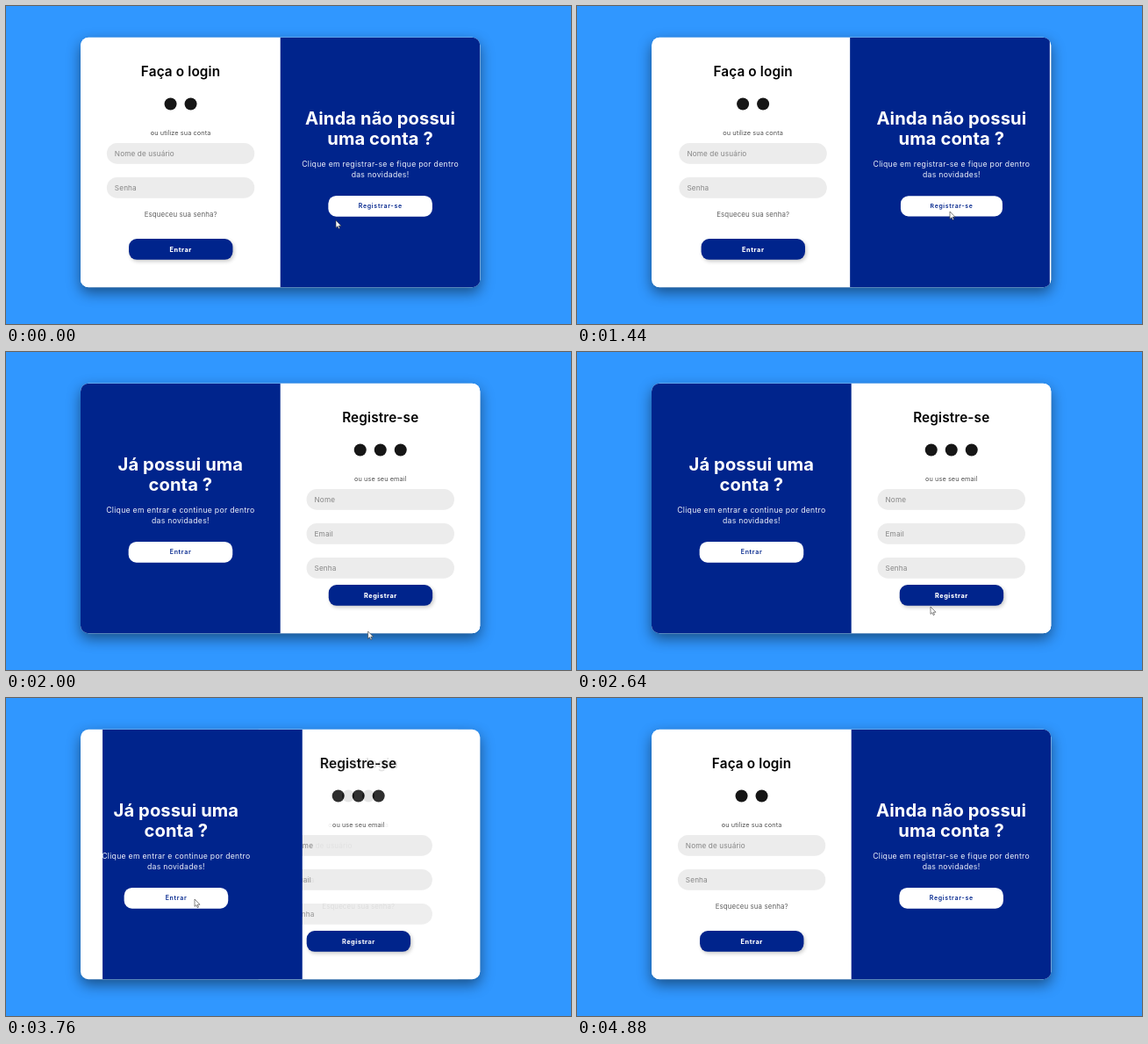
An HTML page with a canvas for the animation above (4.96 s loop, 644 by 362 pixels).

```html
<!DOCTYPE html>
<html lang="pt-BR">
<head>
<meta charset="utf-8">
<title>Login</title>
<style>
  html, body { margin: 0; width: 100%; height: 100%; overflow: hidden; background: #3097ff; }
  canvas { display: block; }
</style>
</head>
<body>
<canvas id="stage" width="644" height="362"></canvas>
<script>
const stage = document.getElementById('stage').getContext('2d');
const layer = new OffscreenCanvas(644, 362).getContext('2d');
let ctx = stage;
const LOOP = 4960, STEP = 80;
const SKY = '#3097ff', NAVY = '#00248c', FIELD = '#ececec', INK = '#161616';
const CARD = { x: 85, y: 35.8, w: 455.4, h: 284.4 };
const HALF = CARD.w / 2, LEFT = CARD.x + HALF / 2, RIGHT = LEFT + HALF;
const OPEN = { at: 1406, length: 576 }, CLOSE = { at: 3612, length: 640 };

// Pointer stops: time, x, y
const POINTER = [
  [0, 376, 244], [400, 452, 284], [700, 462, 270], [1050, 428, 235], [1440, 425, 234],
  [1760, 415, 314], [2100, 412, 319], [2640, 403, 290], [3400, 217, 230], [3760, 215, 229],
  [4080, 247, 274], [4400, 262, 282]
];

const clamp = v => Math.min(1, Math.max(0, v));
const smooth = v => v * v * (3 - 2 * v);

// cubic-bezier(.42, 0, .58, 1)
function easeInOut(x) {
  let lo = 0, hi = 1;
  for (let i = 0; i < 24; i++) {
    const s = (lo + hi) / 2, r = 1 - s;
    if (1.26 * s * r * r + 1.74 * s * s * r + s * s * s < x) lo = s; else hi = s;
  }
  return smooth(lo);
}

const progress = (t, move) => easeInOut(clamp((t - move.at) / move.length));

// Button scale: pressed shortly before the slide starts, then released
function pressScale(t, release) {
  const down = clamp((t - release + 130) / 80), up = clamp((t - release) / 60);
  return 1 - 0.05 * (down - up);
}

function text(str, x, y, size, weight, color, spacing = 0, align = 'center') {
  ctx.font = `${weight} ${size}px Inter, sans-serif`;
  ctx.letterSpacing = spacing + 'px';
  ctx.textAlign = align;
  ctx.fillStyle = color;
  ctx.fillText(str, x, y);
}

function pill(x, y, w, h, r, color) {
  ctx.fillStyle = color;
  ctx.beginPath();
  ctx.roundRect(x, y, w, h, r);
  ctx.fill();
}

function shadowed(color, blur, dx, dy, draw) {
  ctx.save();
  Object.assign(ctx, { shadowColor: color, shadowBlur: blur, shadowOffsetX: dx, shadowOffsetY: dy });
  draw();
  ctx.restore();
}

function field(cx, y, label) {
  pill(cx - 84, y, 168.4, 23.8, 11.9, FIELD);
  text(label, cx - 75, y + 15, 8.2, 400, '#858585', 0.13, 'left');
}

function formButton(cx, label) {
  shadowed('rgba(0,0,0,.22)', 4, 1.5, 2, () => pill(cx - 58.8, 265, 118.4, 23.8, 9, NAVY));
  text(label, cx + 0.4, 279.8, 7.2, 800, '#fff', 0.6);
}

function formBase(cx, title, note, icons) {
  ctx.fillStyle = '#fff';
  ctx.fillRect(cx - HALF / 2, CARD.y, HALF, CARD.h);
  text(title, cx + 0.2, 80.2, 15.3, 600, '#000', 0.15);
  for (let i = 0; i < icons; i++) {
    ctx.fillStyle = INK;
    ctx.beginPath();
    ctx.arc(cx + 0.2 + (i - (icons - 1) / 2) * 23, 111.5, 7, 0, 7);
    ctx.fill();
  }
  text(note, cx + 0.2, 146.8, 7.3, 400, '#505050', 0.1);
}

function loginForm(cx) {
  formBase(cx, 'Faça o login', 'ou utilize sua conta', 2);
  field(cx, 156, 'Nome de usuário');
  field(cx, 195, 'Senha');
  text('Esqueceu sua senha?', cx + 0.3, 239.8, 7.9, 400, '#606060', 0.1);
  formButton(cx, 'Entrar');
}

function registerForm(cx) {
  formBase(cx, 'Registre-se', 'ou use seu email', 3);
  ['Nome', 'Email', 'Senha'].forEach((label, i) => field(cx, 156 + 39 * i, label));
  formButton(cx, 'Registrar');
}

// Draws on a separate layer so that the whole group shares one opacity
function faded(alpha, draw) {
  ctx = layer;
  ctx.clearRect(0, 0, 644, 362);
  draw();
  ctx = stage;
  ctx.globalAlpha = alpha;
  ctx.drawImage(layer.canvas, 0, 0);
  ctx.globalAlpha = 1;
}

function panel(cx, heading, lines, label, scale) {
  heading.forEach((s, i) => text(s, cx, 134.8 + 23 * i, 20.2, 700, '#fff', 0.08));
  lines.forEach((s, i) => text(s, cx, 183.4 + 11.8 * i, 8.7, 400, '#eef1fb', 0.27));
  ctx.save();
  ctx.translate(cx, 227.8);
  ctx.scale(scale, scale);
  pill(-59.2, -11.9, 118.6, 23.8, 9, '#fff');
  text(label, 0.2, 2.6, 7, 600, NAVY, 0.7);
  ctx.restore();
}

function overlay(t, active) {
  ctx.save();
  ctx.beginPath();
  ctx.rect(CARD.x + HALF * (1 - active), CARD.y, HALF, CARD.h);
  ctx.clip();
  ctx.fillStyle = NAVY;
  ctx.fillRect(CARD.x, CARD.y, CARD.w, CARD.h);
  const drift = HALF * 0.2;
  panel(LEFT - drift * (1 - active), ['Já possui uma', 'conta ?'],
    ['Clique em entrar e continue por dentro', 'das novidades!'], 'Entrar', pressScale(t, CLOSE.at));
  panel(RIGHT + drift * active, ['Ainda não possui', 'uma conta ?'],
    ['Clique em registrar-se e fique por dentro', 'das novidades!'], 'Registrar-se', pressScale(t, OPEN.at));
  ctx.restore();
}

function pointer(t) {
  const i = POINTER.findIndex(p => p[0] > t);
  if (i < 1) return;
  const [t0, x0, y0] = POINTER[i - 1], [t1, x1, y1] = POINTER[i];
  const k = smooth((t - t0) / (t1 - t0));
  ctx.save();
  ctx.translate(x0 + (x1 - x0) * k, y0 + (y1 - y0) * k);
  const arrow = new Path2D('M0 0V8.4L1.9 6.7L3.2 9.6L4.5 9L3.2 6.2H6Z');
  ctx.fillStyle = '#fff';
  ctx.fill(arrow);
  ctx.strokeStyle = '#333';
  ctx.lineWidth = 0.6;
  ctx.stroke(arrow);
  ctx.restore();
}

function draw(t) {
  const closing = t >= CLOSE.at;
  const active = closing ? 1 - progress(t, CLOSE) : progress(t, OPEN);
  const cx = LEFT + HALF * active;

  ctx.fillStyle = SKY;
  ctx.fillRect(0, 0, 644, 362);
  shadowed('rgba(0,0,0,.48)', 16, 0, 6, () => pill(CARD.x, CARD.y, CARD.w, CARD.h, 9, '#fff'));

  ctx.save();
  ctx.beginPath();
  ctx.roundRect(CARD.x, CARD.y, CARD.w, CARD.h, 9);
  ctx.clip();
  loginForm(cx);
  // The register form drops behind the login form late in the closing slide
  if (active >= (closing ? 0.375 : 0.5)) faded(closing ? active : 1, () => registerForm(cx));
  overlay(t, active);
  ctx.restore();
  pointer(t);
}

function tick() {
  const t = performance.now() % LOOP;
  draw(Math.floor(t / STEP) * STEP);
  requestAnimationFrame(tick);
}
tick();
</script>
</body>
</html>
```
